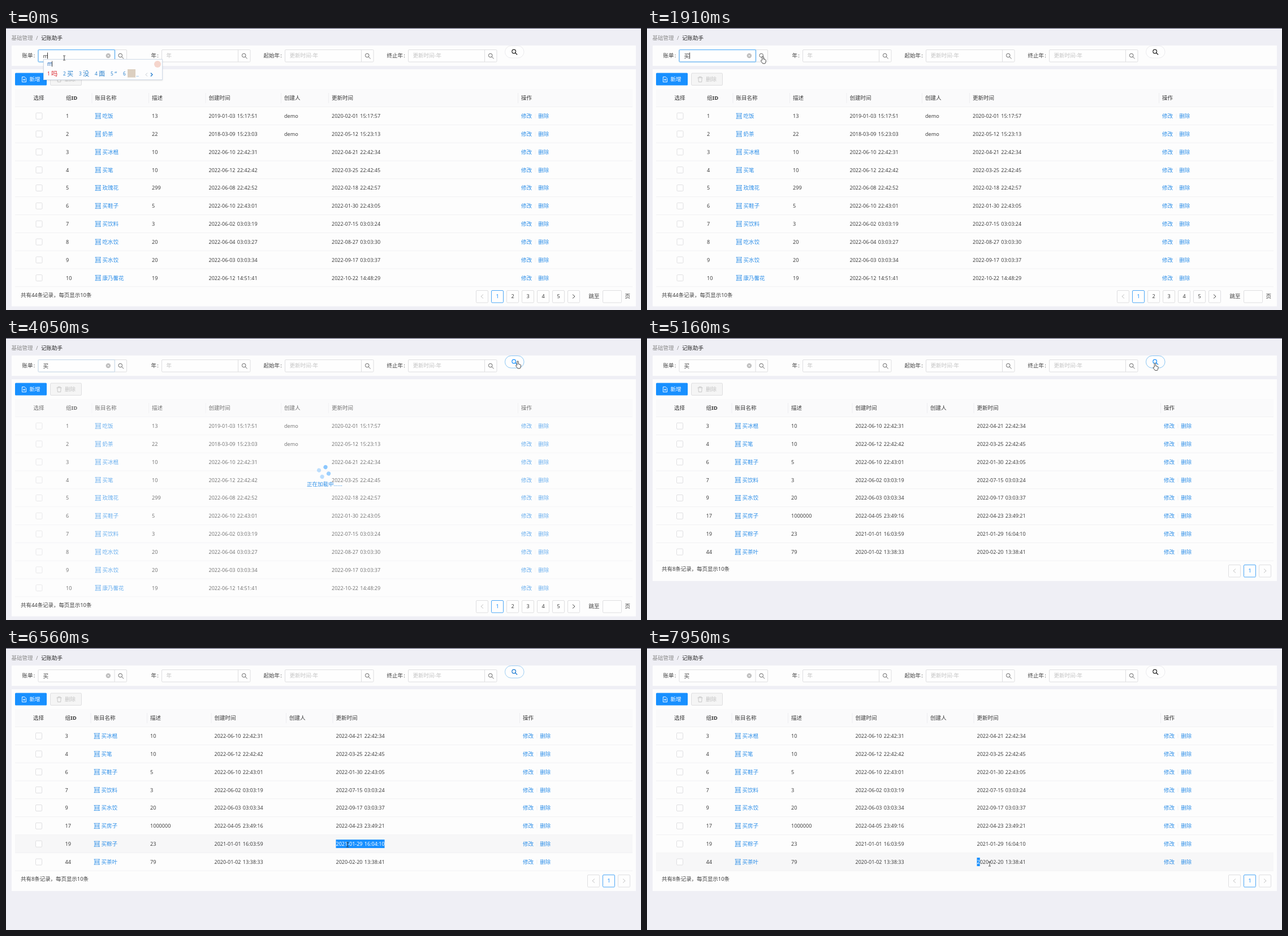
An HTML page for the animation above (8 s loop, 1123x499 px).

```html
<!DOCTYPE html>
<html lang="zh-CN">
<head>
<meta charset="utf-8">
<style>
  html, body { margin: 0; width: 100%; height: 100%; overflow: hidden; background: #efeff5; }
  svg { display: block; width: 100vw; height: 100vh; }
  text { font-family: 'Noto Sans', 'Noto Sans CJK SC', 'Noto Sans CJK', sans-serif; white-space: pre; }
  .date { word-spacing: 1px; }
</style>
</head>
<body>
<svg id="stage" viewBox="0 0 1123 499" preserveAspectRatio="none"></svg>
<script>
const LOOP = 8000;
const BLUE = '#1890ff', LINK = '#2c8ee8', INK = '#404040', EDGE = '#dedee0', PALE = '#c3c3c3';
const COMMIT = 680, CLICK = 3810, LOADED = 4290, PICK = 6500;

const text = (x, cy, s, fill = INK, size = 9.5, more = '') =>
  `<text x="${x}" y="${cy + 3.4}" fill="${fill}" font-size="${size}" ${more}>${s}</text>`;
const box = (x, y, w, h, fill = 'none', stroke = 'none', r = 0, more = '') =>
  `<rect x="${x}" y="${y}" width="${w}" height="${h}" rx="${r}" fill="${fill}" stroke="${stroke}" ${more}/>`;
const path = (d, stroke, width = 1, more = '') =>
  `<path d="${d}" fill="none" stroke="${stroke}" stroke-width="${width}" ${more}/>`;
const at = (x, y, s, more = '') => `<g transform="translate(${x} ${y})" ${more}>${s}</g>`;
const lens = (x, y, color, width = 1) =>
  at(x, y, path('M2 -1A3.3 3.3 0 1 1 -4.6 -1A3.3 3.3 0 1 1 2 -1M1.2 1.5L4.6 4.8', color, width));

// Filter bar
const fields = [
  { x: 57, label: '账单', lx: 28.5, hint: '' },
  { x: 275.5, label: '年', lx: 256.5, hint: '年' },
  { x: 493.5, label: '起始年', lx: 455.5, hint: '更新时间-年' },
  { x: 711.5, label: '终止年', lx: 673.5, hint: '更新时间-年' }
];
const field = f =>
  text(f.lx, 49, f.label + ' :', INK, 9.5, 'word-spacing="-1.2"') +
  box(f.x, 38.5, 156.5, 21.5, '#fefefe', EDGE, 1.5) +
  path(`M${f.x + 135} 38.5v21.5`, EDGE) +
  text(f.x + 8, 49, f.hint, PALE) + lens(f.x + 146.5, 49.5, '#666');

const toolbar =
  box(16, 79.6, 56, 22, BLUE, 'none', 1.5) +
  path('M28.5 86.5h4.5l2.5 2.5v6.5h-7zM32 89.5v4M30 91.5h4', '#fff', .9) +
  text(41.5, 91, '新增', '#fff') +
  box(78.5, 80, 55, 21.3, '#f5f5f5', EDGE, 1.5) +
  path('M89.5 88h9M92 88v-1.7h4v1.7M90.8 88l.5 7.5h5.4l.5-7.5', PALE, .9) +
  text(104, 91, '删除', PALE);

// Tables
const PITCH = 31.83, TOP = 139.5;
const rowY = i => TOP + 16.2 + i * PITCH;
const records = [
  [1, '吃饭', 13, '2019-01-03 15:17:51', '2020-02-01 15:17:57', 'demo'],
  [2, '奶茶', 22, '2018-03-09 15:23:03', '2022-05-12 15:23:13', 'demo'],
  [3, '买冰棍', 10, '2022-06-10 22:42:31', '2022-04-21 22:42:34'],
  [4, '买笔', 10, '2022-06-12 22:42:42', '2022-03-25 22:42:45'],
  [5, '玫瑰花', 299, '2022-06-08 22:42:52', '2022-02-18 22:42:57'],
  [6, '买鞋子', 5, '2022-06-10 22:43:01', '2022-01-30 22:43:05'],
  [7, '买饮料', 3, '2022-06-02 03:03:19', '2022-07-15 03:03:24'],
  [8, '吃水饺', 20, '2022-06-04 03:03:27', '2022-08-27 03:03:30'],
  [9, '买水饺', 20, '2022-06-03 03:03:34', '2022-09-17 03:03:37'],
  [10, '康乃馨花', 19, '2022-06-12 14:51:41', '2022-10-22 14:48:29'],
  [17, '买房子', 1000000, '2022-04-05 23:49:16', '2022-04-23 23:49:21'],
  [19, '买粽子', 23, '2021-01-01 16:03:59', '2021-01-29 16:04:10'],
  [44, '买茶叶', 79, '2020-01-02 13:38:33', '2020-02-20 13:38:41']
];
const titles = ['选择', '组<tspan font-weight="600">ID</tspan>', '账目名称', '描述',
  '创建时间', '创建人', '更新时间', '操作'];
const tableIcon = path('M0 .5h10.5M0 9.5h10.5M1.5 0v10M9 0v10', LINK, .8) +
  path('M3 3h4.5M3 5h4.5M3 7h4.5M3 2.5v5M7.5 2.5v5', LINK, .65);

function row(r, i, c) {
  const y = rowY(i);
  return box(16, TOP + i * PITCH, 1092, PITCH, '#f7f7f8', 'none', 0, 'class="hover" opacity="0"') +
    path(`M16 ${TOP + (i + 1) * PITCH}h1092`, '#f1f1f3') +
    box(c[0] + 4.5, y - 5.5, 11, 11, '#fefefe', EDGE, 1.5) +
    text(c[1], y, r[0], INK, 9.1) +
    at(c[2], y - 5, tableIcon) + text(c[2] + 13, y, r[1], LINK) +
    text(c[3], y, r[2], INK, 9.1) +
    text(c[4], y, r[3], INK, 9, 'class="date"') + text(c[5], y, r[5] || '', INK, 9.1) +
    box(c[6], Math.round(y - 7.5), 86, 15, BLUE, 'none', 0, 'class="mark" opacity="0"') +
    text(c[6], y, `<tspan>${r[4][0]}</tspan><tspan>${r[4].slice(1)}</tspan>`, INK, 9, 'class="date stamp"') +
    text(c[7], y, '修改', LINK) + text(c[7] + 30.3, y, '删除', LINK) +
    path(`M${c[7] + 25} ${y - 4}v8`, '#efefef');
}

function table(id, cols, rows, height, total, footer) {
  const head = box(16, 108, 1092, 31.5, '#fafafb') + path('M16 139.5h1092', '#f1f1f3') +
    titles.map((s, i) => text(cols[i], 124, s, '#383838') +
      (i > 1 ? path(`M${cols[i] - 5.5} 115v18`, '#ededf0') : '')).join('');
  const y = TOP + rows.length * PITCH + 14.5;
  return `<g id="${id}">` + box(10, 73, 1104, height, '#fdfdfd') +
    `<g class="body">${head}${rows.map((r, i) => row(r, i, cols)).join('')}</g>` +
    text(26, y, `共有${total}条记录，每页显示10条`, INK, 9.45) + footer(Math.round(y + 3)) + '</g>';
}

const page = (x, y, s, color = INK, edge = EDGE) =>
  box(x + .5, y - 10.5, 21, 21.5, '#fefefe', edge, 1.5) +
  text(x + 11, y, s, color, 9.1, 'text-anchor="middle"');
const current = (x, y) => page(x, y, 1, BLUE, '#4ba6f6');
const arrow = (x, y, dir, color) => page(x, y, '') +
  path(`M${x + 11 - 2 * dir} ${y - 3.5}l${4 * dir} 3.5l${-4 * dir} 3.5`, color);
const pagerLong = y => arrow(831, y, -1, PALE) + current(858, y) +
  [2, 3, 4, 5].map(n => page(831 + 27 * n, y, n)).join('') + arrow(993, y, 1, '#444') +
  text(1030.5, y, '跳至') + box(1055.5, y - 10.5, 33, 21.5, '#fefefe', EDGE, 1.5) + text(1094.5, y, '页');
const pagerShort = y => arrow(1028, y, -1, PALE) + current(1055, y) + arrow(1082, y, 1, PALE);

const bought = records.filter(r => r[1][0] === '买');

// Input method popup
const candidates = {
  m: ['吗', '买', '没', '面', '“'],
  ma: ['吗', '妈', '马', '嘛', '骂'],
  mai: ['买', '卖', '麦', '迈', '埋']
};
const ime = typed => candidates[typed].map((s, i) => {
  const color = i ? '#2a80cc' : '#d9262e', x = 73 + 28 * i;
  return text(x, 80.3, i + 1, color, 8.3) + text(x + 7, 81.3, s, color, 11.2);
}).join('') + text(73, 63.3, typed, '#1b63b8', 10) +
  path(`M${[0, 81.5, 87, 90][typed.length]} 58.5v10`, '#333', .9);
const popup = `<g id="ime">` +
  box(66.5, 55.5, 210, 36, '#fdfdfe', '#d0dbe8', 0, 'filter="url(#soft)"') +
  '<circle cx="268" cy="64" r="6" fill="#f5d5cc"/><g id="words"></g>' +
  text(207, 80.3, '6', '#2a80cc', 8.3) + box(215, 73, 14, 14.5, '#dccfc0') + text(230.5, 83, '..', '#2a80cc', 8) +
  path('M250 79.5l-3 3 3 3', '#c3c8cf') + path('M256 79.5l3 3-3 3', '#1f78cc', 1.3) + '</g>';

const spinner = '<g id="spin">' + at(562, 237, '<g id="dots">' +
  [0, 90, 180, 270].map(a => `<circle cx="9" r="3.6" fill="${BLUE}" transform="rotate(${a})"/>`).join('') + '</g>') +
  text(532, 258.5, '正在加载中......', LINK) + '</g>';

const more = '<g id="more">' + box(709, 308, 28, 22.5, '#fefefe', 'none', 2, 'filter="url(#lift)"') +
  [315.8, 319.3, 322.8].map(y => `<circle cx="723" cy="${y}" r="1" fill="#222"/>`).join('') + '</g>';

const shapes = {
  beam: path('M-2 -4h1.3l.7.6.7-.6H2M0 -3.5v7M-2 4h1.3l.7-.6.7.6H2', '#333', .9),
  arrow: '<path d="M0 0V9.6l2.2-2 1.6 3.4 1.5-.7-1.6-3.3h3z" fill="#fff" stroke="#333" stroke-width=".8"/>',
  hand: '<path d="M-1.2 7V1.1a1.2 1.2 0 0 1 2.4 0V5l3.4 1q1.2.4 1 1.9l-.6 3-1 2H0L-3.3 8.5q-.3-1.4 1-1.2z" fill="#fff" stroke="#333" stroke-width=".9"/>'
};

const stage = document.getElementById('stage');
stage.innerHTML =
  `<defs>
    <filter id="soft" x="-10%" y="-30%" width="120%" height="180%"><feDropShadow dx="0" dy="1" stdDeviation="1.2" flood-opacity=".12"/></filter>
    <filter id="lift" x="-50%" y="-50%" width="200%" height="220%"><feDropShadow dx="0" dy="2" stdDeviation="2.2" flood-opacity=".35"/></filter>
  </defs>` +
  box(0, 0, 1123, 499, '#efeff5') + box(0, 0, 1123, 1, '#45455c') +
  text(9.5, 17.5, '基础管理', '#8c8c8c') + text(53, 17.5, '/', '#8c8c8c') + text(62, 17.5, '记账助手', '#262626') +
  box(10, 31, 1104, 36, '#fdfdfd') + fields.map(field).join('') +
  `<g id="focus">${box(57, 38.5, 135.5, 21.5, 'none', BLUE, 1.5, 'stroke-opacity=".12" stroke-width="2.6"')}
    ${box(57, 38.5, 135.5, 21.5, 'none', '#62b5f8', 1.5)}</g>` +
  text(65.5, 49.3, '', INK, 9.6, 'id="typed"') + path('M0 43.5v11', '#222', .9, 'id="caret"') +
  '<circle cx="180.8" cy="49" r="4.2" fill="#bdbdbd"/>' + path('M179.3 47.5l3 3m0-3l-3 3', '#fff', .9) +
  box(882.5, 31.5, 33.5, 21.5, '#fefefe', '#ebebee', 10.75) + lens(899.5, 42.5, '#222', 1.2) +
  `<g id="hot">${box(882.5, 31.5, 33.5, 21.5, '#fefefe', '#8cc8f6', 10.75) + lens(899.5, 42.5, BLUE, 1.2)}</g>` +
  table('all', [48.5, 106, 157.5, 258, 358.5, 492, 576, 911], records.slice(0, 10), 419.5, 44, pagerLong) +
  table('found', [48, 104.5, 155.5, 255, 368.5, 501, 583.5, 914], bought, 357, 8, pagerShort) +
  toolbar + spinner + more + popup +
  '<g id="cursor">' + Object.entries(shapes).map(([k, s]) => `<g id="${k}">${s}</g>`).join('') + '</g>';

const $ = id => document.getElementById(id);
const show = (node, on) => node.setAttribute('visibility', on ? 'visible' : 'hidden');
const fade = (node, o) => node.setAttribute('opacity', o);
const ramp = (t, a, b) => Math.min(1, Math.max(0, (t - a) / (b - a)));

// Pointer path: time, x, y
const route = [
  [1490, 103, 53], [1880, 204.5, 50], [2050, 206, 50], [2300, 420, 46], [3050, 890, 43], [3300, 905, 41],
  [4700, 905, 41], [5000, 899, 44], [5160, 899, 44], [5770, 597, 303], [5960, 590, 330], [6000, 590, 336],
  [6300, 604, 348], [7038, 604, 348], [7130, 604.5, 375], [7210, 604.5, 375], [7500, 606, 382]
];
function pointer(t) {
  const i = route.findIndex(p => p[0] > t);
  if (i < 0) return route[route.length - 1].slice(1);
  if (i === 0) return route[0].slice(1);
  const [t0, x0, y0] = route[i - 1], [t1, x1, y1] = route[i], k = (t - t0) / (t1 - t0);
  return [x0 + (x1 - x0) * k, y0 + (y1 - y0) * k];
}
function cursorKind(x, y) {
  if (y < 70) {
    if (x > 882 && x < 917 && y > 31 && y < 53) return 'hand';
    const f = fields.find(f => x > f.x && x < f.x + 157 && y > 38 && y < 60);
    return f ? (x < f.x + 135 ? 'beam' : 'hand') : 'arrow';
  }
  const onStamp = x > 583 && x < 670 && bought.some((r, i) => y > rowY(i) - 3 && y < rowY(i) + 5);
  return onStamp ? 'beam' : 'arrow';
}

// Row highlight lags the pointer: it fades in once most of the recent path lies in the row
function rowHover(i, t) {
  let hits = 0;
  for (let k = 0; k < 16; k++)
    if (Math.floor((pointer(t - 50 - k * 10)[1] - TOP) / PITCH) === i) hits++;
  return ramp(hits, 8, 16);
}

const hovers = [...$('found').querySelectorAll('.hover')];
const marks = [...$('found').querySelectorAll('.mark')];
const stamps = [...$('found').querySelectorAll('.stamp')];
const dots = [...$('dots').children];
const bodies = stage.querySelectorAll('.body');
let shownWord = '';

function select(i, head, rest) {
  fade(marks[i], head ? 1 : 0);
  marks[i].setAttribute('width', rest ? 86 : 5.2);
  const [first, tail] = stamps[i].children;
  first.setAttribute('fill', head ? '#fff' : INK);
  tail.setAttribute('fill', rest ? '#fff' : INK);
}

function draw(t) {
  const word = t < 130 ? 'm' : t < 300 ? 'ma' : t < COMMIT ? 'mai' : '买';
  if (word !== shownWord) {
    $('typed').textContent = shownWord = word;
    if (word !== '买') $('words').innerHTML = ime(word);
  }
  show($('ime'), t < COMMIT);
  const caretX = { m: 73.5, ma: 79, mai: 81.7, 买: 75.5 }[word];
  $('caret').setAttribute('transform', `translate(${caretX} 0)`);
  show($('caret'), t < CLICK && (t < COMMIT || Math.floor((t - COMMIT) / 530) % 2 === 0));
  fade($('focus'), 1 - ramp(t, CLICK, CLICK + 300));
  fade($('hot'), ramp(t, 3050, 3350) - ramp(t, PICK, PICK + 300));

  show($('all'), t < LOADED);
  show($('found'), t >= LOADED);
  const blur = ramp(t, 3900, 4150) - ramp(t, LOADED, 4600);
  bodies.forEach(b => fade(b, 1 - .5 * blur));
  fade($('spin'), ramp(t, 3880, 4030) - ramp(t, LOADED, 4520));
  $('dots').setAttribute('transform', `rotate(${-71 + (t - 4050) * .3})`);
  dots.forEach((d, i) => fade(d, .38 + .12 * Math.cos((t - 4050) / 320 - i * 1.2)));

  hovers.forEach((h, i) => fade(h, rowHover(i, t)));
  const whole = t >= PICK && t < 7870;
  select(6, whole, whole);
  select(7, t >= 7930, false);
  fade($('more'), ramp(t, 6640, 6800) - ramp(t, 7560, 7700));

  const [x, y] = pointer(t), kind = cursorKind(x, y);
  $('cursor').setAttribute('transform', `translate(${x} ${y})`);
  for (const k in shapes) show($(k), k === kind);
}

const start = performance.now();
function tick() {
  draw((performance.now() - start) % LOOP);
  requestAnimationFrame(tick);
}
tick();
</script>
</body>
</html>
```
